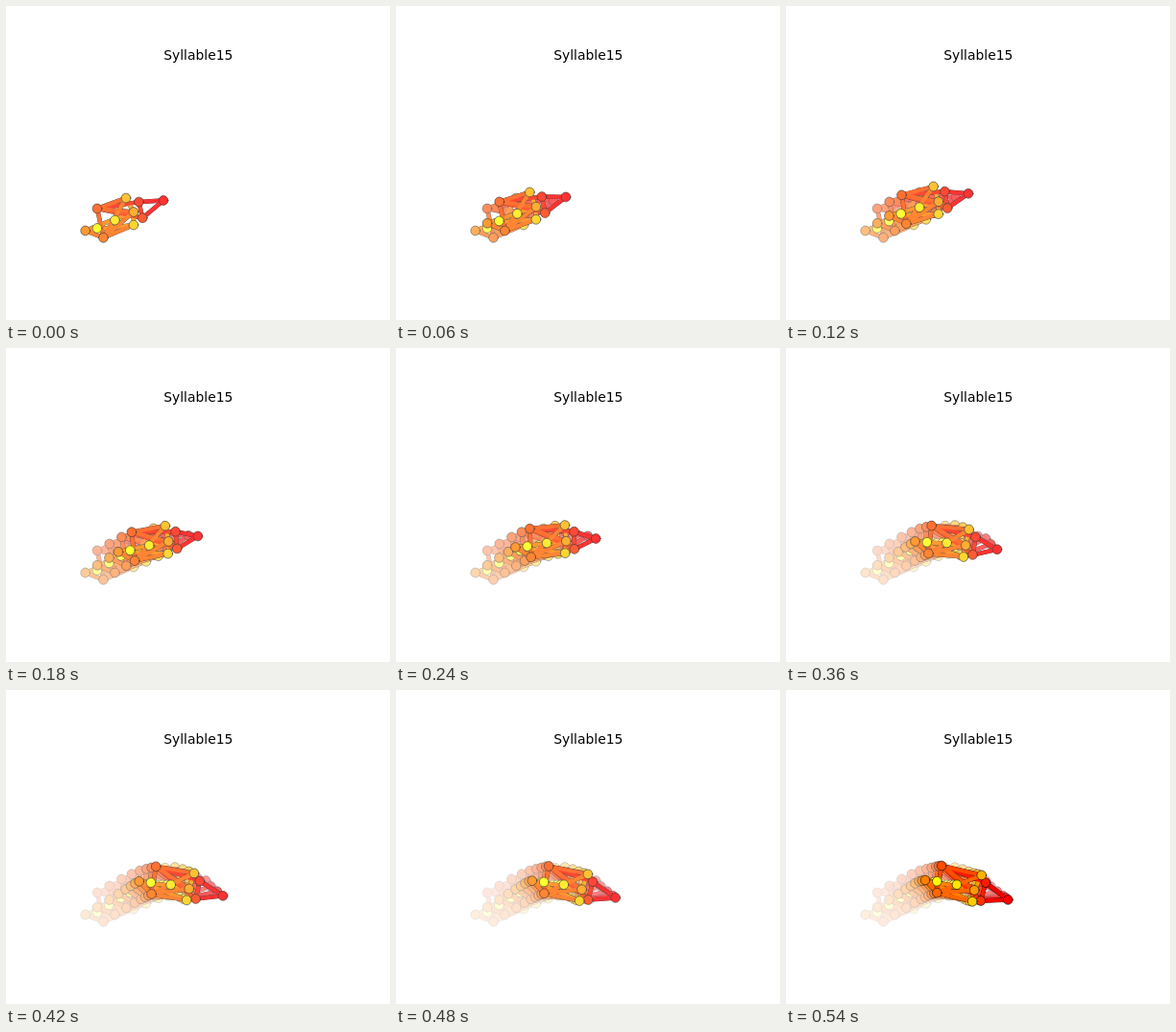
An HTML page for the animation above (600 ms loop, 400x327 px).

```html
<!DOCTYPE html>
<html lang="en">
<head>
<meta charset="utf-8">
<title>Syllable15</title>
<style>
html, body { margin: 0; width: 100%; height: 100%; overflow: hidden; background: #fff; }
svg { display: block; }
text { font: 13.89px "DejaVu Sans", sans-serif; text-anchor: middle; }
</style>
</head>
<body>
<svg id="stage" width="400" height="327" viewBox="0 0 400 327"></svg>
<script>
const STEP = 60, POSES = 10, FADE = 0.2, LINE = 4.17;
const EDGES = 'GH GI FG FI AB AC BC BD CD DE DG DH EF EG EH EI'.split(' ');

// Nodes in body coordinates: distance from the tail and side offset, at first and last pose.
// The nose A and tail F are left out: they span the body axis.
const BODY = {
  B: [62.8, -7.8, 62, -12],
  C: [60.3, 9.1, 61.4, 7.6],
  D: [19.8, -17, 13.2, -18.5],
  E: [14.9, 13.6, 15, 10],
  G: [53.9, 0, 52.3, -1.6],
  H: [51.7, -16.4, 56, -18.5],
  I: [49, 12.6, 53, 10.4],
  J: [32.7, 0.9, 33.2, -3],
  K: [12.4, 2.1, 12.3, -1.6]
};
const NAMES = 'ABCDEFGHIJK';

// Waypoints of tail and nose: step, x, y
const TAIL = [[0, 82.7, 234], [2, 107.5, 218.5], [4, 124.5, 207.5], [7, 138.7, 199.3], [9, 145, 198]];
const NOSE = [[0, 164, 202.5], [2, 190, 195.3], [4, 208.2, 198.5], [5, 213.2, 204.3], [7, 226, 214.3], [9, 231.3, 218.4]];

const lerp = (a, b, u) => a + (b - a) * u;

// Hermite spline through waypoints
function follow(path, t) {
  const end = path.length - 1;
  const slope = (k, c) => {
    const m = Math.min(Math.max(k, 1), end - 1), a = path[m - 1], b = path[m + 1];
    return (b[c] - a[c]) / (b[0] - a[0]);
  };
  let k = 0;
  while (k < end - 1 && path[k + 1][0] <= t) k++;
  const p = path[k], q = path[k + 1], h = q[0] - p[0], u = (t - p[0]) / h, v = 1 - u;
  return [1, 2].map(c => p[c] * v * v * (1 + 2 * u) + q[c] * u * u * (1 + 2 * v)
    + h * u * v * (slope(k, c) * v - slope(k + 1, c) * u));
}

function pose(t) {
  const tail = follow(TAIL, t), nose = follow(NOSE, t), u = t / (POSES - 1);
  const angle = Math.atan2(nose[1] - tail[1], nose[0] - tail[0]);
  const cos = Math.cos(angle), sin = Math.sin(angle);
  const points = { A: nose, F: tail };
  for (const name in BODY) {
    const [along0, side0, along1, side1] = BODY[name];
    const along = lerp(along0, along1, u), side = lerp(side0, side1, u);
    points[name] = [tail[0] + along * cos - side * sin, tail[1] + along * sin + side * cos];
  }
  return points;
}

const svg = document.getElementById('stage');
function add(parent, tag, attrs) {
  const el = document.createElementNS('http://www.w3.org/2000/svg', tag);
  for (const name in attrs) el.setAttribute(name, attrs[name]);
  return parent.appendChild(el);
}

const colour = name => `rgb(255,${Math.round(25.5 * NAMES.indexOf(name))},0)`;

function drawPose(t) {
  const g = add(svg, 'g', { 'stroke-linecap': 'square' });
  const points = pose(t);
  const drawEdges = (width, paint) => {
    for (const [a, b] of EDGES) {
      const [x1, y1] = points[a], [x2, y2] = points[b];
      add(g, 'line', { x1, y1, x2, y2, stroke: paint(a), 'stroke-width': width });
    }
  };
  drawEdges(LINE * 1.1, () => '#000');
  drawEdges(LINE, colour);
  for (const name of NAMES) {
    const [cx, cy] = points[name];
    add(g, 'circle', { cx, cy, r: 4.9, fill: colour(name), stroke: '#000', 'stroke-width': 0.6 });
  }
  // Each veil fades everything drawn so far
  if (t < POSES - 1) add(g, 'rect', { width: 400, height: 327, fill: '#fff', opacity: FADE });
  return g;
}

const poses = Array.from({ length: POSES }, (_, i) => drawPose(i));
add(svg, 'text', { x: 200.3, y: 56 }).textContent = 'Syllable15';

function render(ms) {
  const last = Math.floor(ms / STEP) % POSES;
  poses.forEach((g, i) => { g.style.display = i <= last ? '' : 'none'; });
}

let start;
function tick(now) {
  if (start === undefined) start = now;
  render(now - start);
  requestAnimationFrame(tick);
}
render(0);
requestAnimationFrame(tick);
</script>
</body>
</html>
```
